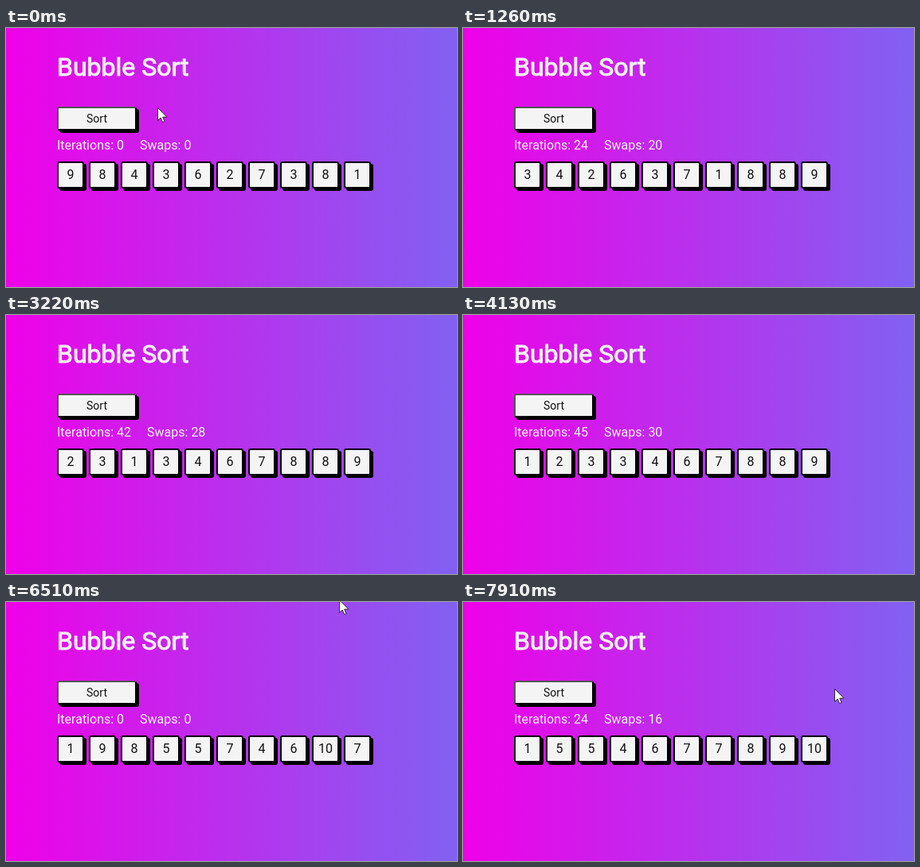
Animation of 566x326 px, one loop 8000 ms. Source, as an HTML page:

```html
<!DOCTYPE html>
<html lang="en">
<head>
<meta charset="utf-8">
<title>Bubble Sort</title>
<style>
  html, body { margin: 0; width: 100%; height: 100%; overflow: hidden; }
  body {
    position: relative;
    background: linear-gradient(90deg, #f000e8, #8161f2);
    color: #f4f4f4;
    font: 16px/20px Roboto, sans-serif;
  }
  h1, .sort, .stats, .cells, .cursor { position: absolute; margin: 0; }
  h1 {
    left: 64px; top: 30px;
    font-size: 32px; font-weight: 400; line-height: 38px;
    white-space: nowrap;
    -webkit-text-stroke: 1px #f4f4f4;
  }
  .sort, .cells div {
    box-sizing: border-box;
    border: 2px solid #000;
    border-radius: 3px;
    background: #f4f4f4;
    color: #111;
    text-align: center;
    box-shadow: 3px 3px #000;
  }
  .sort {
    left: 64px; top: 99px; width: 100px; height: 30px;
    border-style: outset;
    font-size: 14px; line-height: 26px;
  }
  .stats { left: 64px; top: 138px; display: flex; gap: 20px; white-space: nowrap; }
  .cells { left: 64px; top: 168px; display: flex; gap: 6px; }
  .cells div { width: 34px; height: 34px; line-height: 30px; }
  .cursor { left: 0; top: 0; overflow: visible; }
</style>
</head>
<body>
<h1>Bubble Sort</h1>
<div class="sort">Sort</div>
<div class="stats"><span id="iterations"></span><span id="swaps"></span></div>
<div class="cells" id="cells"></div>
<svg class="cursor" id="cursor" width="14" height="21">
  <path d="M.5 .5V16.5L4.2 13L6.6 18.6L9 17.6L6.6 12.1H11.8Z" fill="#fff" stroke="#222" stroke-width=".9"/>
</svg>
<script>
const LOOP = 8000, TICK = 70;
const byId = id => document.getElementById(id);

// State of the list after every full pass of the sort.
function sortPasses(values) {
  const list = [...values];
  let iterations = 0, swaps = 0;
  const snapshot = () => ({ list: [...list], iterations, swaps });
  const passes = [snapshot()];
  for (let end = list.length - 1; end > 0; end--) {
    for (let i = 0; i < end; i++) {
      iterations++;
      if (list[i] > list[i + 1]) {
        [list[i], list[i + 1]] = [list[i + 1], list[i]];
        swaps++;
      }
    }
    passes.push(snapshot());
  }
  return passes;
}

const schedule = (times, values) => {
  const passes = sortPasses(values);
  return times.map((at, i) => ({ at, ...passes[i] }));
};

const states = [
  ...schedule([0, 210, 700, 1260, 1680, 2170, 2730, 3220, 3710, 4130],
              [9, 8, 4, 3, 6, 2, 7, 3, 8, 1]),
  ...schedule([5740, 6930, 7420, 7910],
              [1, 9, 8, 5, 5, 7, 4, 6, 10, 7]),
];

// Each stretch of visible pointer movement: [time, x, y].
const pointerPaths = [
  [[0, 190, 100], [140, 226, 98], [490, 424, 72], [630, 528, 57], [699, 566, 57]],
  [[6020, 551, 36], [6160, 520, -4], [6229, 510, -20]],
  [[6370, 514, -3], [6510, 418, -3], [6650, 190, 92], [6720, 150, 108], [6790, 150, 108],
   [6930, 215, 98], [7140, 384, 72], [7210, 434, 92], [7280, 466, 109], [LOOP, 466, 109]],
];

function pointerAt(t) {
  const path = pointerPaths.find(p => t >= p[0][0] && t < p.at(-1)[0]);
  if (!path) return null;
  const next = path.findIndex(point => point[0] > t);
  const [t0, x0, y0] = path[next - 1], [t1, x1, y1] = path[next];
  const k = (t - t0) / (t1 - t0);
  return [Math.round(x0 + (x1 - x0) * k), Math.round(y0 + (y1 - y0) * k)];
}

const cells = states[0].list.map(() => byId("cells").appendChild(document.createElement("div")));
let shown = null;

function showState(state) {
  if (state === shown) return;
  shown = state;
  byId("iterations").textContent = `Iterations: ${state.iterations}`;
  byId("swaps").textContent = `Swaps: ${state.swaps}`;
  cells.forEach((cell, i) => { cell.textContent = state.list[i]; });
}

function render(t) {
  showState(states.findLast(state => state.at <= t));
  const pointer = pointerAt(Math.floor(t / TICK) * TICK);
  const style = byId("cursor").style;
  style.visibility = pointer ? "visible" : "hidden";
  if (pointer) style.transform = `translate(${pointer[0]}px, ${pointer[1]}px)`;
}

const start = performance.now();
function frame() {
  render((performance.now() - start) % LOOP);
  requestAnimationFrame(frame);
}
frame();
</script>
</body>
</html>
```
